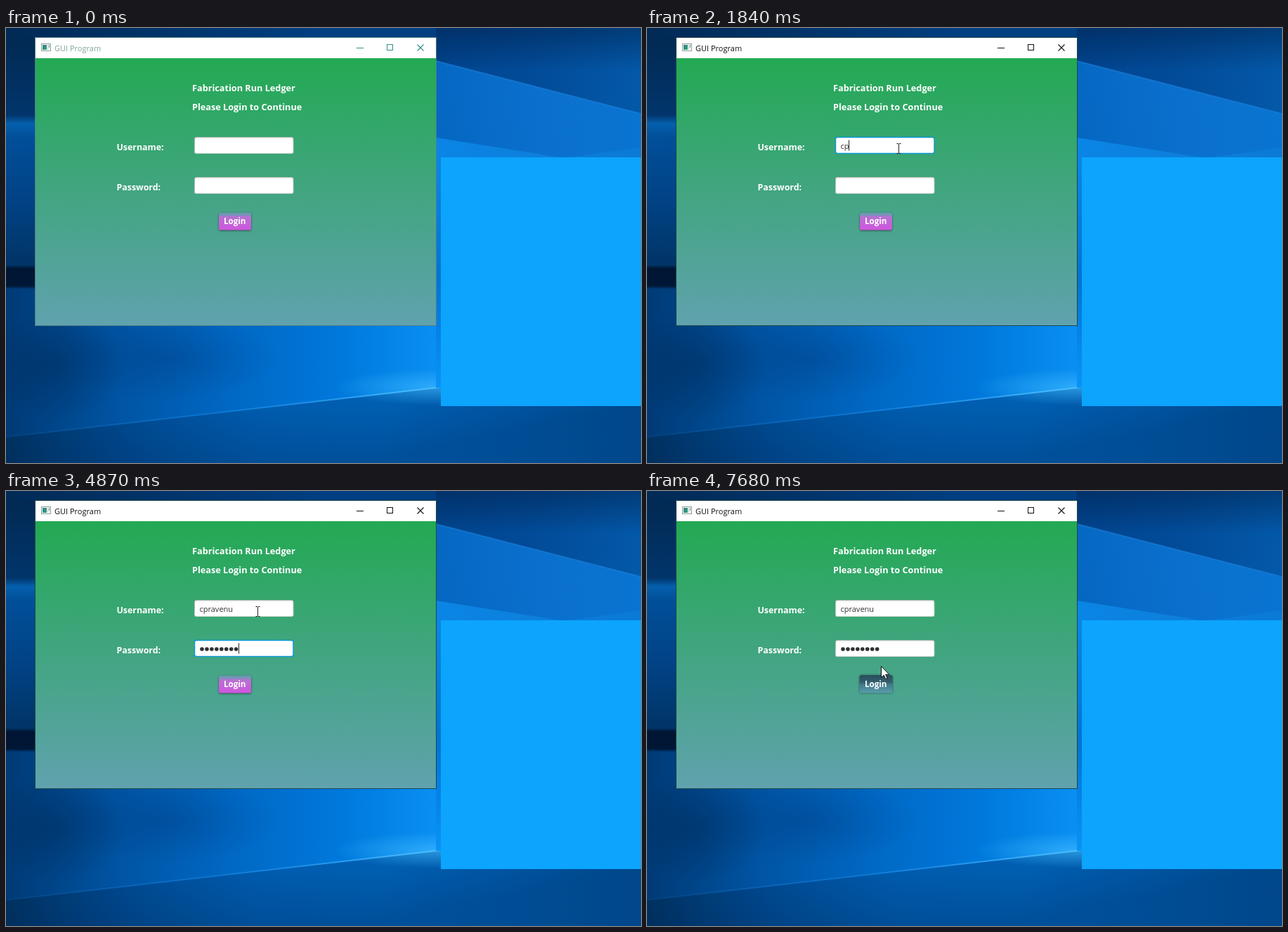
Recreate the animation shown at these times as an HTML page with a canvas. Size 904 by 619 pixels, loop 8000 ms.

```html
<!DOCTYPE html>
<html lang="en">
<head>
<meta charset="utf-8">
<title>GUI Program</title>
<style>
  html, body { margin: 0; width: 100%; height: 100%; overflow: hidden; background: #003a75; }
  canvas { display: block; }
</style>
</head>
<body>
<canvas id="stage" width="904" height="619"></canvas>
<script>
const W = 904, H = 619, LOOP = 8000;
const FONT = '"Open Sans", "Noto Sans", sans-serif';
const USER = 'cpravenu';
const USER_KEYS = [1680, 1840, 1990, 2070, 2220, 2450, 2535, 2620];
const PASS_KEYS = [3220, 3610, 3920, 4090, 4330, 4390, 4550, 4870];
const FOCUS_USER = 1130, CARET_ON = 1250, FOCUS_PASS = 2770;
const PRESS = 6030, RELEASE = 6120, DOT = 6.95;

// Pointer moves: start, end, steps, from, to
const MOVES = [
  [130, 900, 11, [533, 373], [361, 171]],
  [980, 980, 1, [361, 171], [358, 171]],
  [5480, 5880, 6, [358, 174], [338, 268]],
  [6660, 6980, 5, [340, 265], [372, 234]],
  [7150, 7450, 5, [371, 235], [334, 249]],
  [7680, 7680, 1, [334, 249], [333, 249]]
];

const stage = document.getElementById('stage').getContext('2d');

function gradient(c, x0, y0, x1, y1, ...stops) {
  const g = c.createLinearGradient(x0, y0, x1, y1);
  stops.forEach((s, i) => Array.isArray(s)
    ? g.addColorStop(s[0], s[1])
    : g.addColorStop(i / (stops.length - 1), s));
  return g;
}

function poly(c, fill, ...pts) {
  c.beginPath();
  pts.forEach(([x, y]) => c.lineTo(x, y));
  c.closePath();
  c.fillStyle = fill;
  c.fill();
}

function box(c, x, y, w, h, r, fill) {
  c.beginPath();
  c.roundRect(x, y, w, h, r);
  c.fillStyle = fill;
  c.fill();
}

function line(c, color, width, ...pts) {
  c.beginPath();
  pts.forEach(([x, y], i) => i ? c.lineTo(x, y) : c.moveTo(x, y));
  c.strokeStyle = color;
  c.lineWidth = width;
  c.stroke();
}

function text(c, str, x, y, size, color, weight = 400) {
  c.font = `${weight} ${size}px ${FONT}`;
  c.fillStyle = color;
  c.fillText(str, x, y);
}

function glow(c, x, y, rx, ry, rgb, alpha) {
  c.save();
  c.translate(x, y);
  c.scale(rx, ry);
  const g = c.createRadialGradient(0, 0, 0, 0, 0, 1);
  g.addColorStop(0, `rgba(${rgb},${alpha})`);
  g.addColorStop(1, `rgba(${rgb},0)`);
  c.fillStyle = g;
  c.fillRect(-1, -1, 2, 2);
  c.restore();
}

function layer(paint) {
  const cv = document.createElement('canvas');
  cv.width = W;
  cv.height = H;
  paint(cv.getContext('2d'));
  return cv;
}

function paintDesktop(c) {
  c.fillStyle = gradient(c, 0, 0, W, 0, '#012a55', '#01346a', '#013f82', '#013f80', '#013468');
  c.fillRect(0, 0, W, H);

  // Left edge
  c.fillStyle = gradient(c, 0, 0, 0, H, [0, '#012850'], [.2, '#01356b'], [.22, '#0560ad'],
    [.25, '#014f99'], [.4, '#014285'], [.545, '#013466'], [.553, '#001533'], [.593, '#001736'],
    [.6, '#003c7a'], [1, '#003468']);
  c.fillRect(0, 14, 60, H);

  // Lower wall and floor, split by a long beam
  poly(c, gradient(c, 0, 0, 640, 0, '#003a75', '#0054a3', '#0068c4', '#0079dc', '#0b94f8'),
    [0, 372], [640, 372], [640, 511], [0, 584]);
  const floor = [[0, 582], [620, 511], [W, 520], [W, H], [0, H]];
  poly(c, gradient(c, 0, 0, W, 0, '#00305f', '#004a92', '#0060b6', '#006ac6', '#0066c0', '#005cb0'), ...floor);
  poly(c, gradient(c, 300, 525, 330, 660, 'rgba(0,25,60,0)', 'rgba(0,25,60,.32)'), ...floor);
  line(c, gradient(c, 0, 0, 620, 0, 'rgba(30,140,240,.1)', 'rgba(30,150,250,.45)', 'rgba(90,200,255,.9)'),
    2, [0, 582], [620, 511]);
  glow(c, 616, 511, 150, 26, '70,190,255', .6);
  glow(c, 230, 470, 160, 60, '0,40,100', .25);
  glow(c, 70, 480, 100, 80, '0,25,60', .3);

  // Upper right beams
  poly(c, gradient(c, 612, 0, W, 60, '#01448e', '#024b98', '#0358a8'),
    [612, 0], [W, 0], [W, 123], [612, 47]);
  poly(c, gradient(c, 0, 0, 0, 60, 'rgba(0,20,50,.4)', 'rgba(0,20,50,0)'),
    [612, 0], [W, 0], [W, 60], [612, 60]);
  poly(c, gradient(c, 612, 130, W, 90, '#0567c2', '#0a70cd', '#0a74d2'),
    [612, 47], [W, 122], [W, 200], [612, 200]);
  line(c, 'rgba(30,130,220,.55)', 2, [612, 47], [W, 122]);
  poly(c, gradient(c, 612, 0, W, 0, '#0a85e6', '#0d7fdb', '#0a7ad6'),
    [612, 156], [795, 185], [W, 170], [W, 300], [612, 300]);
  c.fillStyle = gradient(c, 0, 200, 0, 520, '#0a84e4', '#0074d4', '#0b94f8');
  c.fillRect(612, 200, 10, 312);

  c.fillStyle = '#0ca4fd';
  c.fillRect(619, 184, 354, 354);
}

function paintWindow(c) {
  c.fillStyle = '#fff';
  c.fillRect(42, 14, 570, 29);
  c.fillStyle = gradient(c, 0, 43, 0, 423, '#23a953', '#42a581', '#60a2ae');
  c.fillRect(42, 43, 570, 380);

  box(c, 50, 22, 14, 11, 0, '#8d9a9a');
  box(c, 51, 23, 12, 9, 0, '#fff');
  box(c, 52, 24, 6, 7, 0, gradient(c, 52, 24, 58, 31, '#2f7f86', '#36a37a'));
  box(c, 59, 24, 1, 7, 0, '#b7c4c4');
  box(c, 61, 24, 1, 4, 0, '#4b8f8c');

  text(c, 'Fabrication Run Ledger', 265, 89.5, 12.7, '#fff', 700);
  text(c, 'Please Login to Continue', 265, 117, 12.7, '#fff', 700);
  text(c, 'Username:', 157.5, 174, 12.4, '#fff', 700);
  text(c, 'Password:', 157.5, 231, 12.4, '#fff', 700);
}

const desktop = layer(c => { paintDesktop(c); paintWindow(c); });

function drawChrome(c, active) {
  const ink = active ? '#111' : '#2f8f82';
  c.strokeStyle = active ? '#1d4a4a' : '#4d7f86';
  c.lineWidth = 1;
  c.strokeRect(41.5, 13.5, 571, 410);
  text(c, 'GUI Program', 69, 32.5, 11, active ? '#111' : '#7fa39d');
  line(c, ink, 1, [499, 28.5], [509, 28.5]);
  c.strokeRect(542.5, 23.5, 8, 8);
  line(c, ink, 1.1, [585.5, 23.5], [594.5, 32.5]);
  line(c, ink, 1.1, [594.5, 23.5], [585.5, 32.5]);
}

function drawField(c, y, focused) {
  if (focused) {
    box(c, 267.5, y - .5, 142.5, 25, 3.5, 'rgba(3,158,211,.35)');
    box(c, 268, y, 141.5, 24, 3, '#0a96d8');
    box(c, 269.2, y + 1.2, 139.1, 21.6, 2, '#fff');
  } else {
    box(c, 268, y, 141.5, 24, 3, gradient(c, 0, y, 0, y + 24, '#a9b8ae', '#c4cfc9'));
    box(c, 269, y + 1, 139.5, 22, 2, gradient(c, 0, y + 1, 0, y + 23, [0, '#efefef'], [.15, '#fff'], [1, '#fff']));
  }
}

function drawCaret(c, x, y) {
  x = Math.floor(x) + .5;
  line(c, '#222', 1, [x, y], [x, y + 15]);
}

function drawButton(c, dark, focused) {
  const grow = focused ? .5 : 0;
  c.save();
  c.shadowColor = 'rgba(0,0,0,.5)';
  c.shadowBlur = 3;
  c.shadowOffsetY = focused ? 0 : 1;
  const fill = dark
    ? gradient(c, 0, 262, 0, 288, [0, '#284f5c'], [.4, '#345f6d'], [.5, '#42798a'], [1, '#5a9fae'])
    : gradient(c, 0, 262, 0, 288, [0, '#5c9fab'], [.18, '#7f8fbb'], [.25, '#b573d0'], [1, '#d253e0']);
  box(c, 303 - grow, 262.5 - grow, 46 + 2 * grow, 25 + grow, focused ? 3 : 2, fill);
  c.restore();
  text(c, 'Login', 310, 279, 11.6, '#fff', 700);
}

function drawArrow(c, x, y) {
  c.save();
  c.translate(x + .5, y + .5);
  c.lineJoin = 'miter';
  poly(c, '#fff', [0, 0], [0, 16], [3.7, 12.6], [6.2, 18], [8.6, 17], [6.2, 11.6], [11.2, 11.6]);
  c.strokeStyle = '#111';
  c.lineWidth = 1;
  c.stroke();
  c.restore();
}

function drawBeam(c, x, y) {
  line(c, '#222', 1, [x + .5, y - 6], [x + .5, y + 7]);
  for (const e of [y - 6.5, y + 7.5]) {
    line(c, '#222', 1, [x - 2.5, e], [x, e]);
    line(c, '#222', 1, [x + 1, e], [x + 3.5, e]);
  }
}

function pointerAt(t) {
  let pos = null;
  for (const [start, end, steps, a, b] of MOVES) {
    if (t < start) break;
    const gap = (end - start) / Math.max(1, steps - 1);
    const k = gap ? Math.min(1, Math.floor((t - start) / gap + 1e-6) / (steps - 1)) : 1;
    const e = k * k * (3 - 2 * k);
    pos = a.map((v, i) => Math.round(v + (b[i] - v) * e));
  }
  return pos;
}

const inside = ([x, y], l, top, r, btm) => x >= l && x < r && y >= top && y < btm;
const typed = (keys, t) => keys.filter(k => t >= k).length;

function draw(t) {
  const c = stage;
  const ptr = pointerAt(t);
  const onUser = t >= FOCUS_USER && t < FOCUS_PASS;
  const onPass = t >= FOCUS_PASS && t < PRESS;
  const onButton = t >= PRESS;

  c.drawImage(desktop, 0, 0);
  drawChrome(c, t >= FOCUS_USER);

  drawField(c, 155, onUser);
  const name = USER.slice(0, typed(USER_KEYS, t));
  text(c, name, 275.5, 171.5, 11, '#333');
  if (onUser && t >= CARET_ON) drawCaret(c, 275.5 + c.measureText(name).width, 159.5);

  drawField(c, 212, onPass);
  const dots = typed(PASS_KEYS, t);
  for (let i = 0; i < dots; i++) {
    c.beginPath();
    c.arc(279 + i * DOT, 225, 2.8, 0, 7);
    c.fillStyle = '#303030';
    c.fill();
  }
  if (onPass) drawCaret(c, 275.6 + dots * DOT, 216.5);

  const hover = ptr && inside(ptr, 303, 262, 350, 288);
  drawButton(c, hover || onButton, onButton);

  if (!ptr) return;
  const [x, y] = ptr;
  if ((t >= FOCUS_USER && t < CARET_ON) || (t >= PRESS && t < RELEASE)) {
    c.beginPath();
    c.arc(x - 1, y - .5, 11.5, 0, 7);
    c.fillStyle = 'rgba(255,240,40,.75)';
    c.fill();
  }
  const overText = inside(ptr, 268, 155, 410, 179) || inside(ptr, 268, 212, 410, 234);
  (overText ? drawBeam : drawArrow)(c, x, y);
}

const begin = performance.now();
function tick() {
  draw((performance.now() - begin) % LOOP);
  requestAnimationFrame(tick);
}
tick();
</script>
</body>
</html>
```
